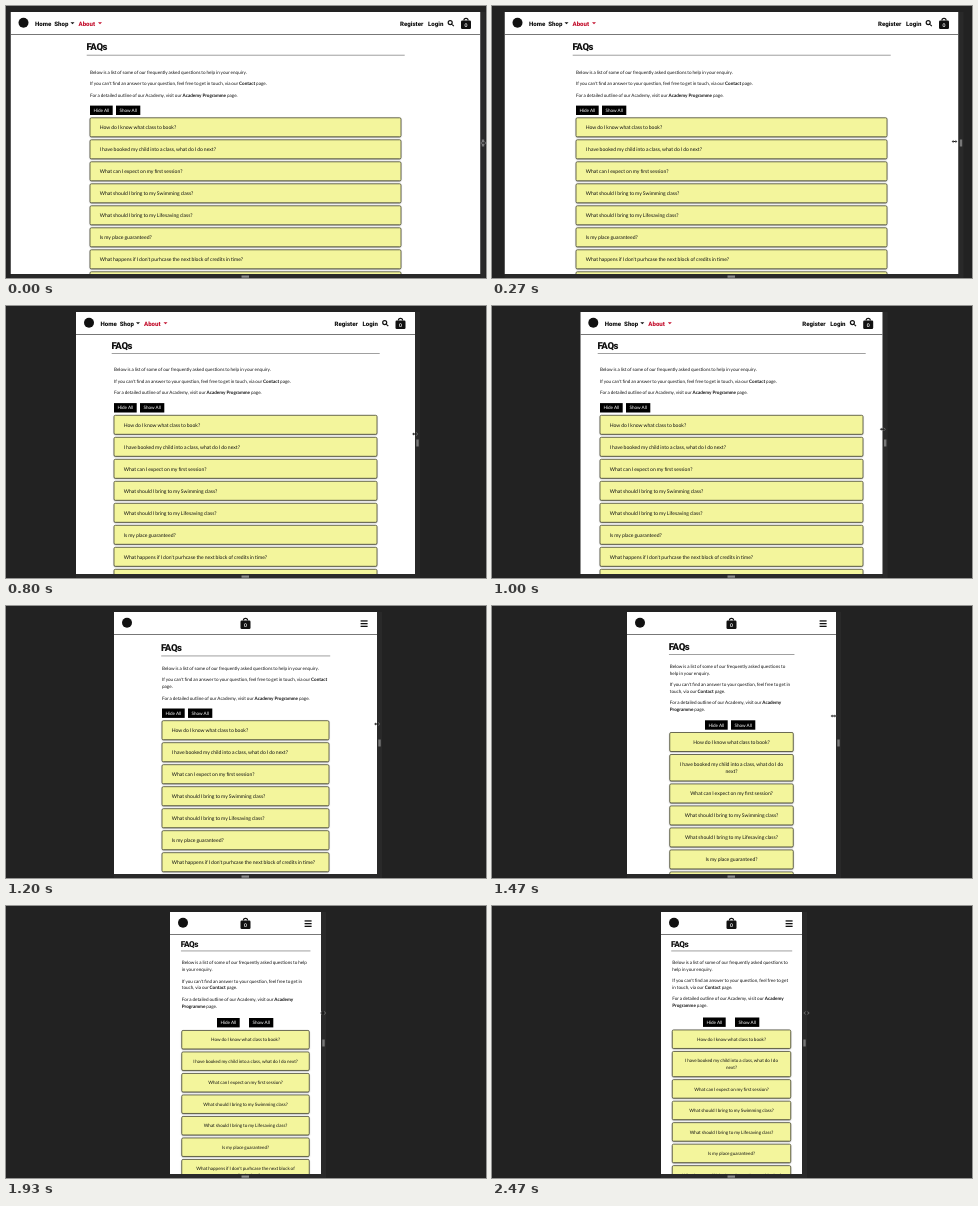
An HTML page with a canvas that plays this animation: 480 px wide and 272 px high, repeating every 2670 ms.

```html
<!DOCTYPE html>
<html lang="en">
<head>
<meta charset="utf-8">
<title>Responsive FAQ page</title>
<style>
  html, body { margin: 0; width: 100%; height: 100%; overflow: hidden; background: #222; }
  canvas { display: block; width: 480px; height: 272px; }
</style>
</head>
<body>
<canvas id="stage" width="480" height="272"></canvas>
<script>
const ctx = document.getElementById('stage').getContext('2d');
ctx.textRendering = 'geometricPrecision';

const LOOP = 2670, STEP = 1000 / 15, CENTER = 239.5, TOP = 6, BOTTOM = 268;
const INK = '#111', RED = '#c4122f', YELLOW = '#f3f59c';

// step, half the page width, pointer offset from the right edge, pointer y
const KEYS = [
  [1, 235, 3, 137], [4, 227, -4, 135.5], [9, 184.5, -1, 131], [12, 169.5, 0, 128],
  [17, 139, 0, 120], [18, 131.5, 0, 118], [22, 104.5, -2.5, 110],
  [25, 89.5, 0, 108], [29, 75.5, 2, 107], [33, 71.7, 4, 107], [37, 70.5, 4.5, 107]
];

// Breakpoints, widest first
const LAYOUTS = [
  { min: 341, rule: 318, card: 311, ruleY: 49.2, textY: 66 },
  { min: 291, rule: 268, card: 263, ruleY: 47.5, textY: 63.5 },
  { min: 240, rule: 169, card: 167, ruleY: 50, textY: 62 },
  { min: 186, rule: 125.5, card: 123.5, ruleY: 48.5, textY: 60, centered: true },
  { min: 143, rule: 129.5, card: 127.5, ruleY: 45, textY: 56.5, centered: true, compact: true },
  { min: 0, rule: 121, card: 118.5, ruleY: 45, textY: 56, centered: true, compact: true }
];

// A leading * marks a bold word
const PARAGRAPHS = [
  'Below is a list of some of our frequently asked questions to help in your enquiry.',
  "If you can't find an answer to your question, feel free to get in touch, via our *Contact page.",
  'For a detailed outline of our Academy, visit our *Academy *Programme page.'
];
const QUESTIONS = [
  'How do I know what class to book?',
  'I have booked my child into a class, what do I do next?',
  'What can I expect on my first session?',
  'What should I bring to my Swimming class?',
  'What should I bring to my Lifesaving class?',
  'Is my place guaranteed?',
  "What happens if I don't purhcase the next block of credits in time?",
  ''
];

const bodyFont = (size, weight = 400) => `${weight} ${size}px Lato, sans-serif`;
const titleFont = size => `900 ${size}px Roboto, sans-serif`;

function rect(x, y, w, h, color) {
  ctx.fillStyle = color;
  ctx.fillRect(x, y, w, h);
}

function disc(x, y, r, color) {
  ctx.fillStyle = color;
  ctx.beginPath();
  ctx.arc(x, y, r, 0, 7);
  ctx.fill();
}

function polygon(points, color) {
  ctx.fillStyle = color;
  ctx.beginPath();
  points.forEach(([x, y]) => ctx.lineTo(x, y));
  ctx.fill();
}

function write(text, x, y, font, color = INK, align = 'left') {
  ctx.font = font;
  ctx.fillStyle = color;
  ctx.textAlign = align;
  ctx.fillText(text, x, y);
}

function wrap(text, width, size) {
  const space = 0.193 * size, lines = [];
  let line = { words: [], width: 0 };
  for (const token of text.split(' ')) {
    const bold = token[0] === '*';
    const word = { text: bold ? token.slice(1) : token, font: bodyFont(size, bold ? 700 : 400) };
    ctx.font = word.font;
    const wordWidth = ctx.measureText(word.text).width;
    if (!lines.length || line.width + space + wordWidth > width) {
      lines.push(line = { words: [], width: -space });
    }
    word.x = line.width + space;
    line.width = word.x + wordWidth;
    line.words.push(word);
  }
  return lines;
}

function writeLine(line, x, y) {
  line.words.forEach(word => write(word.text, x + word.x, y, word.font));
}

function drawBag(x) {
  ctx.strokeStyle = INK;
  ctx.lineWidth = 1.2;
  ctx.beginPath();
  ctx.arc(x, 14.5, 2.1, Math.PI, 0);
  ctx.stroke();
  ctx.fillStyle = INK;
  ctx.beginPath();
  ctx.roundRect(x - 5, 14.5, 10, 8.5, 1.2);
  ctx.fill();
  write('0', x, 21, bodyFont(5, 700), '#fff', 'center');
}

function drawHeader(left, right) {
  const link = (text, x, color) => write(text, x, 19.8, titleFont(6.1), color);
  const caret = (x, color) => polygon([[x - 2, 16.2], [x + 2, 16.2], [x, 18.3]], color);
  disc(left + 13, 16.8, 5, INK);
  if (right - left > 291) {
    link('Home', left + 24.5);
    link('Shop', left + 43.8);
    caret(left + 62, INK);
    link('About', left + 68, RED);
    caret(left + 89.5, RED);
    link('Register', right - 80.5);
    link('Login', right - 52.5);
    ctx.strokeStyle = INK;
    ctx.lineWidth = 1.2;
    ctx.beginPath();
    ctx.arc(right - 30.3, 16.6, 2, 0, 7);
    ctx.moveTo(right - 28.8, 18.1);
    ctx.lineTo(right - 26.7, 20.2);
    ctx.stroke();
    drawBag(right - 14.5);
  } else {
    drawBag(CENTER);
    for (const y of [14.3, 17, 19.7]) rect(right - 16.4, y, 7, 1.3, INK);
  }
  rect(left, 28, right - left, 0.8, '#555');
}

function drawButton(text, x, y, width) {
  rect(x, y - 4.7, width, 9.4, '#000');
  write(text, x + width / 2, y + 1.6, bodyFont(4.6), '#fff', 'center');
}

function drawCard(x, y, width, height) {
  ctx.save();
  ctx.shadowColor = 'rgba(0,0,0,.5)';
  ctx.shadowBlur = 1.5;
  ctx.shadowOffsetY = 0.8;
  ctx.fillStyle = YELLOW;
  ctx.beginPath();
  ctx.roundRect(x, y, width, height, 1.3);
  ctx.fill();
  ctx.restore();
  ctx.strokeStyle = '#4a4a36';
  ctx.lineWidth = 0.8;
  ctx.stroke();
}

function drawContent({ rule, card, ruleY, textY, centered, compact }) {
  const ruleX = CENTER + 0.2 - rule / 2, x = CENTER - card / 2;
  ctx.letterSpacing = '-0.4px';
  write('FAQs', ruleX - 0.3, ruleY - (compact ? 3.8 : 5), titleFont(compact ? 8.2 : 9.6));
  ctx.letterSpacing = '0px';
  rect(ruleX, ruleY - 0.4, rule, 0.7, '#777');

  let y = textY;
  for (const text of PARAGRAPHS) {
    for (const line of wrap(text, card + 1, 4.6)) {
      writeLine(line, x, y + 1.6);
      y += 6.9;
    }
    y += 4.6;
  }

  y += compact ? 5 : 3.8;
  const hideX = compact ? 211 : centered ? 213 : x;
  drawButton('Hide All', hideX, y, 22.7);
  drawButton('Show All', hideX + (compact ? 32 : 26), y, 24.3);

  const size = compact ? 4.57 : 5.07, base = compact ? 18.5 : 19;
  const lineHeight = compact ? 6.7 : 7.4;
  y += 17 - base / 2;
  for (const question of QUESTIONS) {
    const lines = wrap(question, card - 18, size);
    const height = base + (lines.length - 1) * lineHeight;
    drawCard(x, y, card, height);
    lines.forEach((line, i) => {
      const lineX = centered ? CENTER - line.width / 2 : x + 9.7;
      writeLine(line, lineX, y + base / 2 + i * lineHeight + 1.7);
    });
    y += height + 3;
  }
}

function drawPointer(x, y) {
  for (const side of [-1, 1]) {
    polygon([[x + side * 3, y], [x + side, y - 1.7], [x + side, y + 1.7]], '#999');
    polygon([[x + side * 2.5, y], [x + side, y - 1], [x + side, y + 1]], INK);
  }
  rect(x - 1, y - 0.5, 2, 1, INK);
}

function pose(step) {
  const i = Math.max(1, KEYS.findIndex(key => key[0] >= step));
  const a = KEYS[i - 1], b = KEYS[i], k = (step - a[0]) / (b[0] - a[0]);
  return a.map((value, n) => value + (b[n] - value) * k);
}

function draw(time) {
  const step = Math.min(37, Math.max(1, Math.floor((time % LOOP + 5) / STEP)));
  const [, half, pointerX, pointerY] = pose(step);
  const left = CENTER - half, right = CENTER + half, width = 2 * half;

  rect(0, 0, 480, 272, '#222');
  rect(right, TOP, 5, 266, '#292929');
  rect(left, BOTTOM, width, 4, '#292929');
  rect(right + 1.3, 133.5, 2.4, 7, '#777');
  rect(235.5, 269.5, 7.5, 2.2, '#888');

  ctx.save();
  ctx.beginPath();
  ctx.rect(left, TOP, width, BOTTOM - TOP);
  ctx.clip();
  rect(left, TOP, width, BOTTOM - TOP, '#fff');
  drawHeader(left, right);
  drawContent(LAYOUTS.find(layout => width >= layout.min));
  ctx.restore();

  drawPointer(right + pointerX, pointerY);
}

function tick() {
  draw(performance.now());
  requestAnimationFrame(tick);
}
tick();
</script>
</body>
</html>
```
